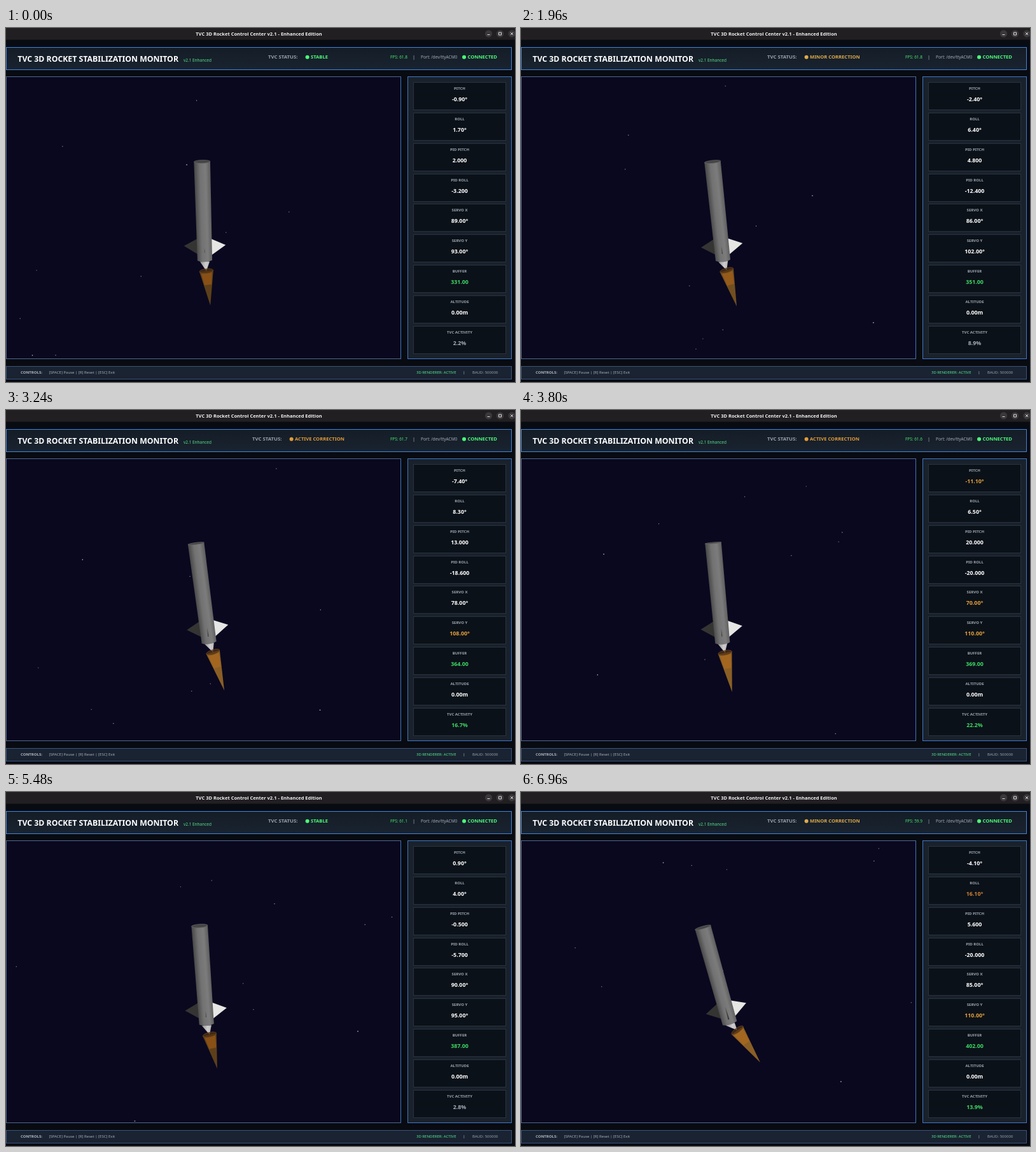
An HTML page that plays this animation: 800 by 556 pixels, repeating every 7000 ms.

```html
<!DOCTYPE html>
<html lang="en">
<head>
<meta charset="utf-8">
<title>TVC 3D Rocket Control Center</title>
<style>
  html, body { margin: 0; width: 100%; height: 100%; overflow: hidden; background: #080b11; }
  svg { display: block; width: 800px; height: 556px; font-family: "Noto Sans", "Open Sans", sans-serif; }
  .b { font-weight: 700; }
  .mid { text-anchor: middle; }
  .s6 { font-size: 6px; }
  .s64 { font-size: 6.45px; }
  .s76 { font-size: 7.6px; }
  .label { font-size: 6px; font-weight: 700; fill: #a0a8b2; text-anchor: middle; }
  .value { font-size: 8.8px; font-weight: 700; text-anchor: middle; }
</style>
</head>
<body>
<svg viewBox="0 0 800 556">
  <defs>
    <linearGradient id="metal">
      <stop offset="0" stop-color="#474747"/>
      <stop offset=".35" stop-color="#727272"/>
      <stop offset=".7" stop-color="#7c7c7c"/>
      <stop offset="1" stop-color="#5c5c5c"/>
    </linearGradient>
    <linearGradient id="cone">
      <stop offset="0" stop-color="#949294"/>
      <stop offset=".6" stop-color="#cfcdcf"/>
      <stop offset="1" stop-color="#b8b6b8"/>
    </linearGradient>
    <linearGradient id="panel" x2="0" y2="1">
      <stop offset="0" stop-color="#141d27"/>
      <stop offset="1" stop-color="#19232f"/>
    </linearGradient>
    <clipPath id="view"><rect x="1" y="77" width="619" height="442"/></clipPath>
  </defs>

  <!-- window bar -->
  <rect width="800" height="18.5" fill="#211f21"/>
  <text class="b mid" x="397.5" y="11.8" font-size="7.5" fill="#f2f2f2">TVC 3D Rocket Control Center v2.1 - Enhanced Edition</text>
  <g fill="#3a383a">
    <circle cx="758.5" cy="9" r="5.7"/><circle cx="776.5" cy="9" r="5.7"/><circle cx="795" cy="9" r="5.7"/>
  </g>
  <path d="M756.5 10.5h4M774.5 7h4v4h-4zM793 7l4 4M797 7l-4 4" fill="none" stroke="#eee" stroke-width=".9"/>

  <!-- header -->
  <rect x=".5" y="30.5" width="794" height="35" fill="url(#panel)" stroke="#4384dc"/>
  <text class="b" x="18.3" y="52.6" font-size="12.28" fill="#fff">TVC 3D ROCKET STABILIZATION MONITOR</text>
  <text class="s64" x="279" y="53" fill="#5be08a">v2.1 Enhanced</text>
  <g id="status">
    <text class="b" x="412" y="47.8" font-size="7.8" fill="#9aa2ac">TVC STATUS:</text>
    <g id="state"><circle cx="473.6" cy="45.8" r="3"/><text id="stateText" class="b s76" x="479" y="47.8"></text></g>
  </g>
  <text id="fps" class="s64" x="604" y="47.6" fill="#4be86f"></text>
  <text class="s64 mid" x="641" y="47.6" fill="#d0d5dc">|</text>
  <text class="s64" x="652" y="47.6" fill="#a6aeb8">Port: /dev/ttyACM0</text>
  <g fill="#4cff78"><circle cx="720" cy="45.8" r="3"/><text class="b s76" x="725.5" y="47.8">CONNECTED</text></g>

  <!-- scene -->
  <rect x=".5" y="76.5" width="620" height="443" fill="#0a081f" stroke="#4f6890"/>
  <path d="M620.5 77v443" stroke="#3f74c0"/>
  <g clip-path="url(#view)">
    <g id="stars"></g>
    <path id="nozzle" fill="url(#cone)"/>
    <g id="rocket">
      <path d="M-11 29.7L-32.2 40.3L-11 54z" fill="#343432"/>
      <path d="M10 30L33.4 40.6L10 56.5z" fill="#e6e6e4"/>
      <path d="M-12.8 -91L-11.6 64Q0 69 11.6 64L12.8 -91z" fill="url(#metal)"/>
      <ellipse id="cap" cy="-91" rx="12.8" fill="#454545" stroke="#686868" stroke-width=".7"/>
      <path id="slit" fill="#393939"/>
    </g>
    <g id="flame">
      <path id="plume"/>
      <path id="core"/>
      <ellipse rx="3.6" ry="11" fill="#4e3014" fill-opacity=".75" stroke="#70471a" stroke-width=".7"/>
    </g>
  </g>

  <!-- sidebar -->
  <rect x="631.5" y="76.5" width="163" height="443" fill="#19212c" stroke="#3f78c8"/>
  <g id="cards"></g>

  <!-- footer -->
  <rect x=".5" y="531.5" width="794" height="20" fill="#1a2331" stroke="#3a5480"/>
  <text class="b s6" x="23" y="543.4" fill="#b4bac4">CONTROLS:</text>
  <text class="s6" x="67.5" y="543.4" fill="#a6aeb8">[SPACE] Pause | [R] Reset | [ESC] Exit</text>
  <text class="s6" x="645" y="543.4" fill="#55ec90">3D RENDERER: ACTIVE</text>
  <text class="s6 mid" x="720" y="543.4" fill="#d0d5dc">|</text>
  <text class="s6" x="733" y="543.4" fill="#9aa2ac">BAUD: 500000</text>
</svg>

<script>
const LOOP = 7000, STEP = 40;
const PIVOT = { x: 310.7, y: 301 };
const WHITE = '#fff', ORANGE = '#e3a03c', RUST = '#cc8236', GREEN = '#3fd765', GRAY = '#a5adb7';

const STABLE = { text: 'STABLE', fill: '#4cff78', shift: 0 };
const MINOR = { text: 'MINOR CORRECTION', fill: '#e0aa48', shift: -25 };
const ACTIVE = { text: 'ACTIVE CORRECTION', fill: '#e59b35', shift: -25 };

// Key attitudes; PID values beyond 20 saturate.
const KEYS = [
  { t: 0, pitch: -0.9, roll: 1.7, pidP: 2, pidR: -3.2, state: STABLE },
  { t: 1280, pitch: -1.5, roll: 2.5, pidP: 4.4, pidR: -7.9, state: STABLE },
  { t: 2640, pitch: -3.4, roll: 10.2, pidP: 5.2, pidR: -16.9, state: MINOR },
  { t: 3800, pitch: -11.1, roll: 6.5, pidP: 20.2, pidR: -20.2, state: ACTIVE },
  { t: 4760, pitch: 0.5, roll: 15.1, pidP: 4.1, pidR: -20.2, state: ACTIVE },
  { t: 5480, pitch: 0.9, roll: 4, pidP: -0.5, pidR: -5.7, state: STABLE },
  { t: 6960, pitch: -4.1, roll: 16.1, pidP: 5.6, pidR: -20.2, state: MINOR }
];

const $ = id => document.getElementById(id);
const set = (el, attrs) => { for (const k in attrs) el.setAttribute(k, attrs[k]); };
const clamp = (v, lo, hi) => Math.max(lo, Math.min(hi, v));
const tenth = v => Math.round(v * 10) / 10;
const random = n => { const v = Math.sin(n * 127.1 + 11.7) * 43758.5453; return v - Math.floor(v); };
const polar = (r, deg) => {
  const a = deg * Math.PI / 180;
  return { x: r * Math.sin(a), y: r * Math.cos(a) };
};

const LABELS = ['PITCH', 'ROLL', 'PID PITCH', 'PID ROLL', 'SERVO X', 'SERVO Y', 'BUFFER', 'ALTITUDE', 'TVC ACTIVITY'];
$('cards').innerHTML = LABELS.map((name, i) => `
  <g transform="translate(0 ${Math.round(i * 47.85)})">
    <rect x="640.5" y="85.5" width="145" height="43" fill="#0b1118" stroke="#29323d"/>
    <text class="label" x="713" y="97.2">${name}</text>
    <text class="value" x="713" y="115.2"></text>
  </g>`).join('');
const values = document.querySelectorAll('.value');

const STARS = 10;
$('stars').innerHTML = '<rect/>'.repeat(STARS);
const stars = [...$('stars').children];

function poseAt(t) {
  const i = Math.max(1, KEYS.findIndex(k => k.t >= t));
  const a = KEYS[i - 1], b = KEYS[i];
  const k = (t - a.t) / (b.t - a.t);
  const mix = name => a[name] + (b[name] - a[name]) * k;
  const swing = v => Math.sign(v) * Math.trunc(Math.max(0, Math.abs(tenth(v)) - 0.01));
  const p = { pitch: mix('pitch'), roll: mix('roll'), pidP: mix('pidP'), pidR: mix('pidR') };
  p.servoX = swing(p.pidP);
  p.servoY = swing(p.pidR);
  p.activity = (Math.abs(p.servoX) + Math.abs(p.servoY)) / 1.8;
  p.state = (k < 0.5 ? a : b).state;
  return p;
}

// Each star falls, then re-enters at a new random column.
function drawStars(t) {
  stars.forEach((star, i) => {
    const fall = random(i) + t * (0.5 + 0.3 * random(i + 20)) / 1000;
    const lap = Math.floor(fall);
    const size = 1 + 0.4 * random(i + 40);
    set(star, {
      x: 2 + 614 * random(i + 60 + lap * STARS), y: 77 + 442 * (fall - lap),
      width: size, height: size,
      fill: `rgba(230,230,235,${0.4 + 0.6 * random(i + 80)})`
    });
  });
}

function drawRocket({ pitch, roll, activity }) {
  const tilt = roll + 0.1 * pitch;
  set($('rocket'), {
    transform: `translate(${PIVOT.x} ${PIVOT.y}) rotate(${-tilt}) scale(1 ${1 - 0.0015 * pitch})`
  });
  set($('cap'), { ry: Math.max(0.8, 2.6 + pitch * 0.15) });
  const h = 3 + roll * 0.45, w = 0.3 + roll * 0.05;
  set($('slit'), { d: `M0 ${48 - h}L${w} ${48 + h}L${-w} ${48 + h}z` });

  // The gimbal swings the exhaust further than the hull leans.
  const thrust = 3.5 + 2.15 * roll + 0.65 * pitch;
  const tail = polar(66, tilt), swing = polar(15, thrust * 1.4), rim = polar(7.5, tilt + 90);
  const base = { x: PIVOT.x + tail.x, y: PIVOT.y + tail.y };
  const tip = { x: base.x + swing.x, y: base.y + swing.y };
  set($('nozzle'), {
    d: `M${base.x - rim.x} ${base.y - rim.y}L${base.x + rim.x} ${base.y + rim.y}L${tip.x} ${tip.y}z`
  });

  const len = 53 + 0.65 * Math.min(activity, 15);
  const heat = clamp((activity - 6) / 6, 0, 1);
  const tone = (lo, hi) => `rgb(${lo.map((x, i) => Math.round(x + (hi[i] - x) * heat))})`;
  set($('flame'), { transform: `translate(${tip.x} ${tip.y}) rotate(${90 - thrust})` });
  set($('plume'), { d: `M0 -11L${len} 0L0 11z`, fill: tone([92, 64, 25], [138, 95, 37]) });
  set($('core'), { d: `M3 -8.5L${len * 0.4} -5.6V5.6L3 8.5z`, fill: tone([136, 80, 22], [162, 102, 32]) });
}

function drawReadouts(p, t) {
  const degrees = v => v.toFixed(2) + '°';
  const pid = v => tenth(clamp(v, -20, 20)).toFixed(3);
  const lean = v => Math.abs(v) > 15 ? RUST : Math.abs(v) >= 10 ? ORANGE : WHITE;
  const servo = v => Math.abs(v) >= 15 ? ORANGE : WHITE;
  const rows = [
    [degrees(tenth(p.pitch)), lean(p.pitch)],
    [degrees(tenth(p.roll)), lean(p.roll)],
    [pid(p.pidP), WHITE],
    [pid(p.pidR), WHITE],
    [degrees(90 - p.servoX), servo(p.servoX)],
    [degrees(90 - p.servoY), servo(p.servoY)],
    [Math.floor(331.2 + t / 98).toFixed(2), GREEN],
    ['0.00m', WHITE],
    [p.activity.toFixed(1) + '%', p.activity >= 10 ? GREEN : GRAY]
  ];
  rows.forEach(([text, fill], i) => {
    values[i].textContent = text;
    set(values[i], { fill });
  });
  $('fps').textContent = 'FPS: ' + (61.8 - 1.9 * (t / LOOP) ** 4).toFixed(1);
  $('stateText').textContent = p.state.text;
  set($('state'), { fill: p.state.fill });
  set($('status'), { transform: `translate(${p.state.shift} 0)` });
}

function render() {
  const t = Math.floor(performance.now() % LOOP / STEP) * STEP;
  const pose = poseAt(t);
  drawStars(t);
  drawRocket(pose);
  drawReadouts(pose, t);
  requestAnimationFrame(render);
}
render();
</script>
</body>
</html>
```
